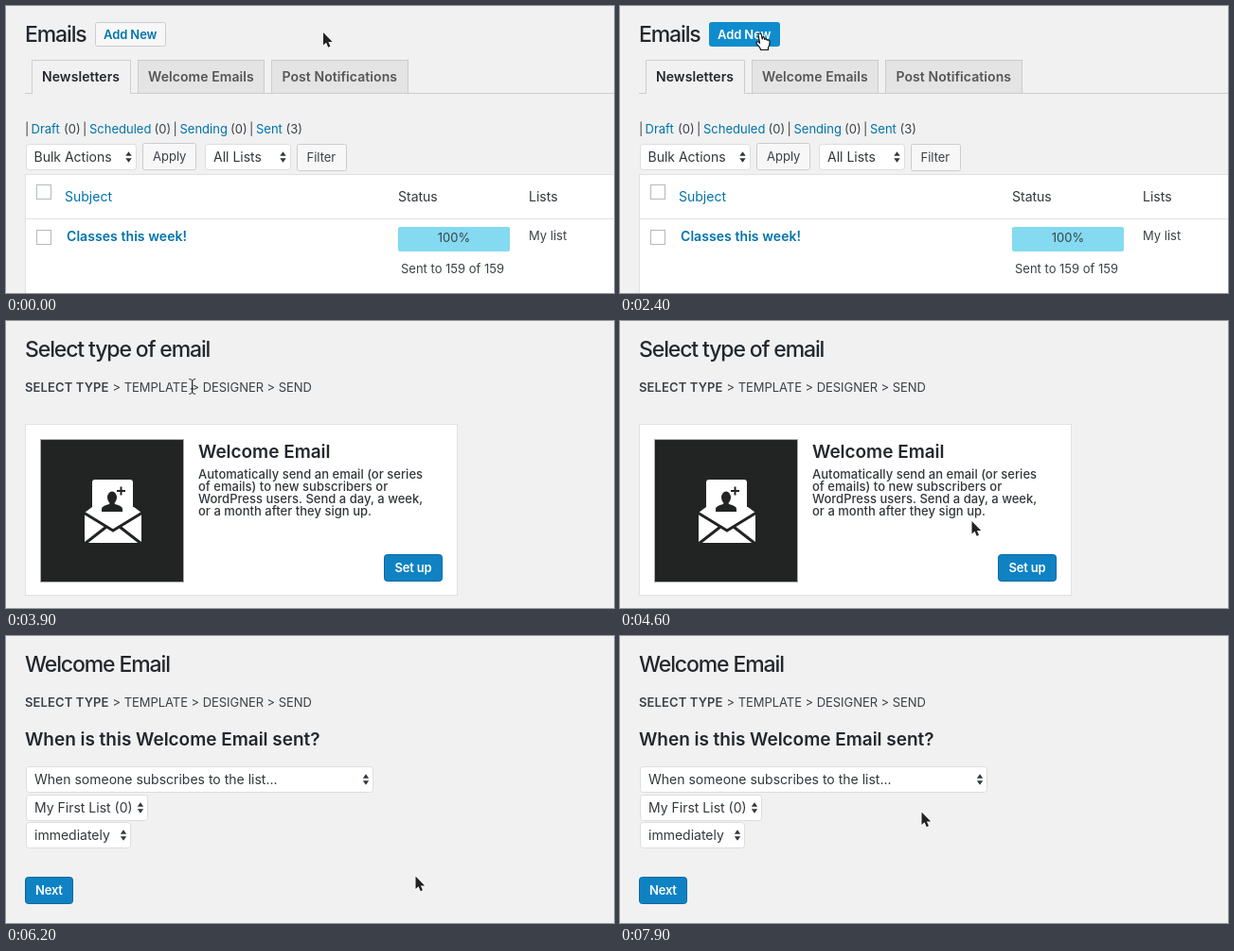
Write an HTML page that moves like this. It is 642 px wide and 304 px high and loops after 8000 ms.

```html
<!DOCTYPE html>
<html lang="en">
<head>
<meta charset="utf-8">
<title>Welcome email setup</title>
<style>
  html, body { margin: 0; width: 100%; height: 100%; overflow: hidden; background: #f1f1f1; }
  svg { display: block; width: 642px; height: 304px; }
  text { font: 13px Inter, sans-serif; font-optical-sizing: none; fill: #3c4146; white-space: pre; }
  .title { font-size: 23px; font-weight: 450; letter-spacing: -1.12px; fill: #23282d; }
  .heading { font-size: 19px; font-weight: 600; letter-spacing: -.03px; fill: #23282d; }
  .field { font-size: 14px; fill: #32373c; }
  .tab { font-size: 14px; font-weight: 600; letter-spacing: .07px; fill: #555; }
  .para { font-weight: 450; letter-spacing: .02px; fill: #32373c; }
  .crumb { letter-spacing: -.05px; }
  .bold { font-weight: 600; letter-spacing: .12px; }
  .link { fill: #0073aa; }
  .primary text { font-weight: 600; letter-spacing: -.2px; fill: #fff; }
  .primary rect { fill: #0f82c3; stroke: #0a68a0; }
  .primary.hover rect { fill: #0f8ccd; }
  .action rect { fill: #f7f7f7; stroke: #ccc; }
  .action text { font-weight: 600; letter-spacing: -.1px; fill: #0073aa; }
  .action.hover rect { fill: #0f8ccd; stroke: #0f8ccd; }
  .action.hover text { fill: #fff; }
  .button { fill: #f7f7f7; stroke: #ccc; }
  .select { fill: #fff; stroke: #ddd; }
  .box { fill: #fff; stroke: #b4b9be; }
  .card { fill: #fff; stroke: #e1e1e1; }
  .hidden { display: none; }
</style>
</head>
<body>
<svg viewBox="0 0 642 304">
  <defs>
    <path id="arrows" d="M-3.2-1.3h6.4L0-5.8zM-3.2 1.3h6.4L0 5.8z" fill="#32373c"/>
    <path id="beam" d="M-3.5-7.5Q0-7.5 0-5V6Q0 8.5-3.5 8.5M3.5-7.5Q0-7.5 0-5V6Q0 8.5 3.5 8.5M-2 3H2" fill="none"/>
    <g id="crumbs">
      <text class="bold" x="20" y="75">SELECT TYPE</text>
      <text class="crumb" x="112.5" y="75">&gt; TEMPLATE &gt; DESIGNER &gt; SEND</text>
    </g>
  </defs>

  <g class="page">
    <text class="title" x="20" y="38">Emails</text>
    <g class="action" id="add">
      <rect x="94.5" y="17.5" width="74" height="25" rx="2"/>
      <text x="103" y="35">Add New</text>
    </g>

    <path d="M20 92.5H27.5V57.5H131.5V92.5H642" fill="none" stroke="#ccc"/>
    <g fill="#e4e4e4" stroke="#ccc">
      <rect x="139.5" y="57.5" width="133" height="35"/>
      <rect x="280.5" y="57.5" width="144" height="35"/>
    </g>
    <text class="tab" x="38" y="80" style="fill:#23282d">Newsletters</text>
    <text class="tab" x="150" y="80">Welcome Emails</text>
    <text class="tab" x="291.5" y="80">Post Notifications</text>

    <text x="20" y="135">|</text>
    <text class="link" x="26.5" y="135">Draft</text><text x="61" y="135">(0)</text>
    <text x="81" y="135">|</text>
    <text class="link" x="88" y="135">Scheduled</text><text x="156.5" y="135">(0)</text>
    <text x="176.5" y="135">|</text>
    <text class="link" x="183.5" y="135">Sending</text><text x="237" y="135">(0)</text>
    <text x="257" y="135">|</text>
    <text class="link" x="264" y="135">Sent</text><text x="295.5" y="135">(3)</text>

    <rect class="select" x="21.5" y="146.5" width="116" height="27" rx="3"/>
    <text class="field" x="29.5" y="165">Bulk Actions</text>
    <use href="#arrows" x="129.5" y="160"/>
    <rect class="button" x="144.5" y="145.5" width="56" height="28" rx="2"/>
    <text x="155" y="164">Apply</text>
    <rect class="select" x="210.5" y="146.5" width="90" height="27" rx="3"/>
    <text class="field" x="219" y="165">All Lists</text>
    <use href="#arrows" x="292.5" y="160"/>
    <rect class="button" x="307.5" y="146.5" width="52" height="28" rx="2"/>
    <text x="317.5" y="165">Filter</text>

    <rect class="card" x="20.5" y="178.5" width="640" height="140"/>
    <path d="M21 225.5H642" stroke="#e1e1e1"/>
    <rect class="box" x="32.5" y="189.5" width="15" height="15"/>
    <rect class="box" x="32.5" y="237.5" width="15" height="15"/>
    <text class="field" x="62" y="207" style="fill:#0073aa">Subject</text>
    <text class="field" x="414" y="207">Status</text>
    <text class="field" x="552" y="207">Lists</text>
    <text class="tab" x="64" y="249" style="fill:#0073aa">Classes this week!</text>
    <rect x="414" y="234" width="118" height="26" rx="2" fill="#83daf1"/>
    <text x="473" y="250" text-anchor="middle">100%</text>
    <text x="552" y="248">My list</text>
    <text x="417" y="283">Sent to 159 of 159</text>
  </g>

  <g class="page hidden">
    <text class="title" x="20" y="38">Select type of email</text>
    <use href="#crumbs"/>
    <rect class="card" x="20.5" y="109.5" width="456" height="181"/>
    <rect x="36.5" y="125.5" width="151" height="151" fill="#222423" stroke="#aaa"/>
    <path d="M83 203L91 197H135L143 203V233Q143 235 141 235H85Q83 235 83 233Z" fill="#fff"/>
    <path d="M82 203L113 222 144 203M83 236L106 218M143 236L120 218" fill="none" stroke="#222423" stroke-width="3"/>
    <path d="M91 206V171Q91 168 94 168H131Q134 168 134 171V206L113 219Z" fill="#fff"/>
    <g fill="#222423">
      <ellipse cx="112" cy="187" rx="5" ry="6.5"/>
      <path d="M101 202V199Q101 196 109 194L110 191H114L115 194Q123 196 123 199V202Z"/>
      <path d="M120.5 175.5h2v3.5h3.5v2h-3.5v3.5h-2v-3.5h-3.5v-2h3.5z"/>
    </g>
    <text class="heading" x="203" y="145">Welcome Email</text>
    <text class="para" x="203" y="167">Automatically send an email (or series</text>
    <text class="para" x="203" y="180">of emails) to new subscribers or</text>
    <text class="para" x="203" y="193">WordPress users. Send a day, a week,</text>
    <text class="para" x="203" y="206">or a month after they sign up.</text>
    <g class="primary" id="setup">
      <rect x="399.5" y="247.5" width="61" height="28" rx="3"/>
      <text x="410.5" y="266">Set up</text>
    </g>
  </g>

  <g class="page hidden">
    <text class="title" x="20" y="38">Welcome Email</text>
    <use href="#crumbs"/>
    <text class="heading" x="20" y="116">When is this Welcome Email sent?</text>
    <rect class="select" x="21.5" y="138.5" width="366" height="27" rx="3"/>
    <text class="field" x="30" y="157">When someone subscribes to the list...</text>
    <use href="#arrows" x="380" y="152"/>
    <rect class="select" x="21.5" y="168.5" width="128" height="27" rx="3"/>
    <text class="field" x="30" y="187">My First List (0)</text>
    <use href="#arrows" x="142" y="182"/>
    <rect class="select" x="21.5" y="197.5" width="110" height="27" rx="3"/>
    <text class="field" x="30" y="216">immediately</text>
    <use href="#arrows" x="124" y="211"/>
    <g class="primary">
      <rect x="20.5" y="255.5" width="50" height="28" rx="3"/>
      <text x="31" y="274">Next</text>
    </g>
  </g>

  <g id="cursor">
    <path class="shape" d="M0 0V13.5L3.1 10.8 5.2 15.8 7.5 14.8 5.4 9.900H9.700Z" fill="#222" stroke="#fff" stroke-width="1.6" paint-order="stroke"/>
    <path class="shape hidden" d="M-2.500 1Q-2.500-.5-1-.5T.8 1L1.800 5.500Q3 0 4.200 5.800 5.800 4.600 6.600 6.600 9.500 5.800 9.600 8.800 9.800 12 8 14.500V17H.2Q-.5 14-3.500 11.500-5.500 9-3.800 8.300-2.500 8-1 9.800Z" fill="#fff" stroke="#111" stroke-width="1.2" stroke-linejoin="round"/>
    <g class="shape hidden">
      <use href="#beam" stroke="#fff" stroke-width="2.5"/>
      <use href="#beam" stroke="#222"/>
    </g>
  </g>
</svg>
<script>
  const LOOP = 8000, STEP = 100;
  const ARROW = 0, HAND = 1, BEAM = 2;
  const smooth = p => p * p * (3 - 2 * p);
  const speedUp = p => p ** 1.6;
  const scenes = [
    { start: 0, from: [335, 28], moves: [
      { start: 400, end: 1200, to: [148.5, 29.5], ease: smooth }] },
    { start: 2500, from: [148.5, 29.5], moves: [
      { start: 3600, end: 4600, to: [371.5, 212], ease: smooth },
      { start: 4900, end: 5600, to: [432.5, 256], ease: smooth }] },
    { start: 6000, from: [432.5, 254.5], moves: [
      { start: 7200, end: 7900, to: [318.5, 186.5], ease: speedUp }] },
  ];
  const pages = document.querySelectorAll('.page');
  const shapes = document.querySelectorAll('.shape');
  const cursor = document.getElementById('cursor');
  const add = document.getElementById('add');
  const setup = document.getElementById('setup');

  const showOnly = (items, index) =>
    items.forEach((item, i) => item.classList.toggle('hidden', i !== index));
  const inside = ([x, y], left, top, right, bottom) =>
    x >= left && x <= right && y >= top && y <= bottom;

  const position = (time, { from, moves }) =>
    moves.reduce((point, { start, end, to, ease }) => {
      const p = ease(Math.min(1, Math.max(0, (time - start) / (end - start))));
      return point.map((value, i) => value + (to[i] - value) * p);
    }, from);

  function render(now) {
    const time = Math.floor(now % LOOP / STEP) * STEP;
    const page = scenes.filter(scene => time >= scene.start).length - 1;
    const point = position(time, scenes[page]);
    const overAdd = page === 0 && inside(point, 94, 17, 169, 43);
    const overSetup = page === 1 && inside(point, 399, 247, 461, 276);
    const overText = page === 1 && (inside(point, 20, 16, 215, 44) ||
      inside(point, 20, 62, 323, 79) || inside(point, 203, 155, 440, 208));

    showOnly(pages, page);
    showOnly(shapes, overAdd || overSetup ? HAND : overText ? BEAM : ARROW);
    add.classList.toggle('hover', overAdd);
    setup.classList.toggle('hover', overSetup);
    cursor.setAttribute('transform', `translate(${point})`);
  }

  const origin = performance.now();
  function tick() {
    render(performance.now() - origin);
    requestAnimationFrame(tick);
  }
  tick();
</script>
</body>
</html>
```
